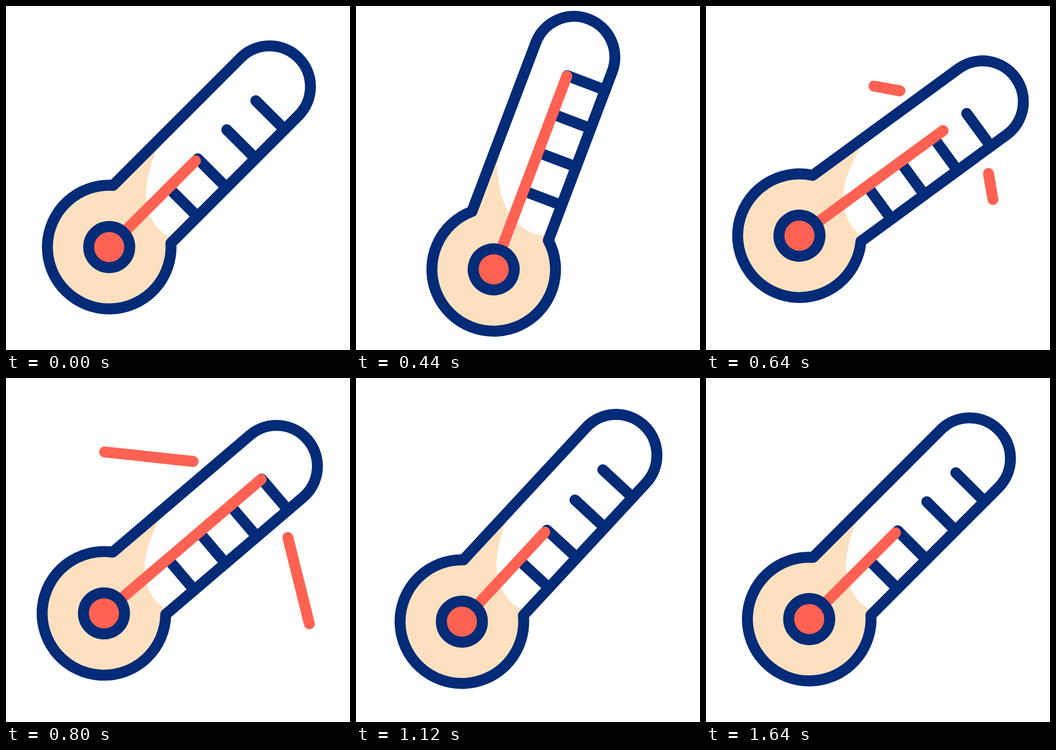
An HTML page for the animation above (2 s loop, 640x640 px).

```html
<!DOCTYPE html>
<html lang="en">
<head>
<meta charset="utf-8">
<title>Thermometer</title>
<style>
  html, body { margin: 0; width: 100%; height: 100%; overflow: hidden; background: #fff; }
  svg { display: block; width: 100vw; height: 100vh; }
  .line { fill: none; stroke-width: 20.4; stroke-linecap: round; stroke-linejoin: round; }
  .navy { stroke: #032b77; }
  .red { stroke: #ff6252; }
</style>
</head>
<body>
<svg viewBox="0 0 640 640">
  <g transform="translate(320.5 320)">
    <g id="sparks">
      <path class="line red"/>
      <path class="line red"/>
    </g>
    <g id="body">
      <g transform="translate(0 181.7)">
        <path fill="#fff" d="M-76-86V-422A76 76 0 0 1 76-422V-86Z"/>
        <path fill="#fde0bf" d="M-76-86.3L-76-210L-66-193C-57-165-32-123-10-108C14-91 45-82 70-95L76-86.3A115 115 0 1 1-76-86.3Z"/>
        <path class="line navy" d="M.3-385.4H76M.3-309H76M.3-232.6H76M.3-156.2H76"/>
        <path class="line navy" d="M-76-86.3V-422A76 76 0 0 1 76-422V-86.3A115 115 0 1 1-76-86.3Z"/>
        <path id="mercury" class="line red"/>
        <circle class="navy" r="38.2" fill="#ff6252" stroke-width="20.4"/>
      </g>
    </g>
  </g>
</svg>
<script>
const LOOP = 2000, STEP = 40;

// [time, value] keys, eased between neighbours
const tilt = [[0, 0], [400, -25], [690, 10], [938, -5], [1343, 2.5], [1640, 0]];
const level = [[0, 227], [460, 384.6], [632, 331], [785, 384.6], [1110, 227]];
const head = [[535, 0], [790, 1]];
const tail = [[785, 0], [1060, 1]];

// near and far end of each spark, relative to the centre
const sparkEnds = [[[15, -166.4], [-151, -171]], [[201.3, -39.8], [254, 117.6]]];

const body = document.getElementById('body');
const sparks = document.getElementById('sparks');
const mercury = document.getElementById('mercury');

// cubic-bezier(.6, 0, .4, 1)
function ease(x) {
  let lo = 0, hi = 1, u = x;
  for (let i = 0; i < 24; i++) {
    u = (lo + hi) / 2;
    const v = 1 - u;
    if (1.8 * u * v * v + 1.2 * u * u * v + u * u * u < x) lo = u; else hi = u;
  }
  return u * u * (3 - 2 * u);
}

function valueAt(keys, t) {
  if (t <= keys[0][0]) return keys[0][1];
  for (let i = 1; i < keys.length; i++) {
    const [t0, a] = keys[i - 1], [t1, b] = keys[i];
    if (t < t1) return a + (b - a) * ease((t - t0) / (t1 - t0));
  }
  return keys[keys.length - 1][1];
}

function pointOn([a, b], k) {
  return a.map((v, i) => (v + (b[i] - v) * k).toFixed(2)).join(' ');
}

function draw(t) {
  const angle = valueAt(tilt, t);
  body.setAttribute('transform', `rotate(${45 + angle})`);
  sparks.setAttribute('transform', `rotate(${angle})`);
  mercury.setAttribute('d', `M0 0V${-valueAt(level, t)}`);

  const from = valueAt(tail, t), to = valueAt(head, t);
  sparkEnds.forEach((ends, i) => {
    const d = to - from > 0.001 ? `M${pointOn(ends, from)}L${pointOn(ends, to)}` : '';
    sparks.children[i].setAttribute('d', d);
  });
}

const start = performance.now();
function tick() {
  const t = Math.max(0, performance.now() - start) % LOOP;
  draw(Math.floor(t / STEP) * STEP);
  requestAnimationFrame(tick);
}
tick();
</script>
</body>
</html>
```
